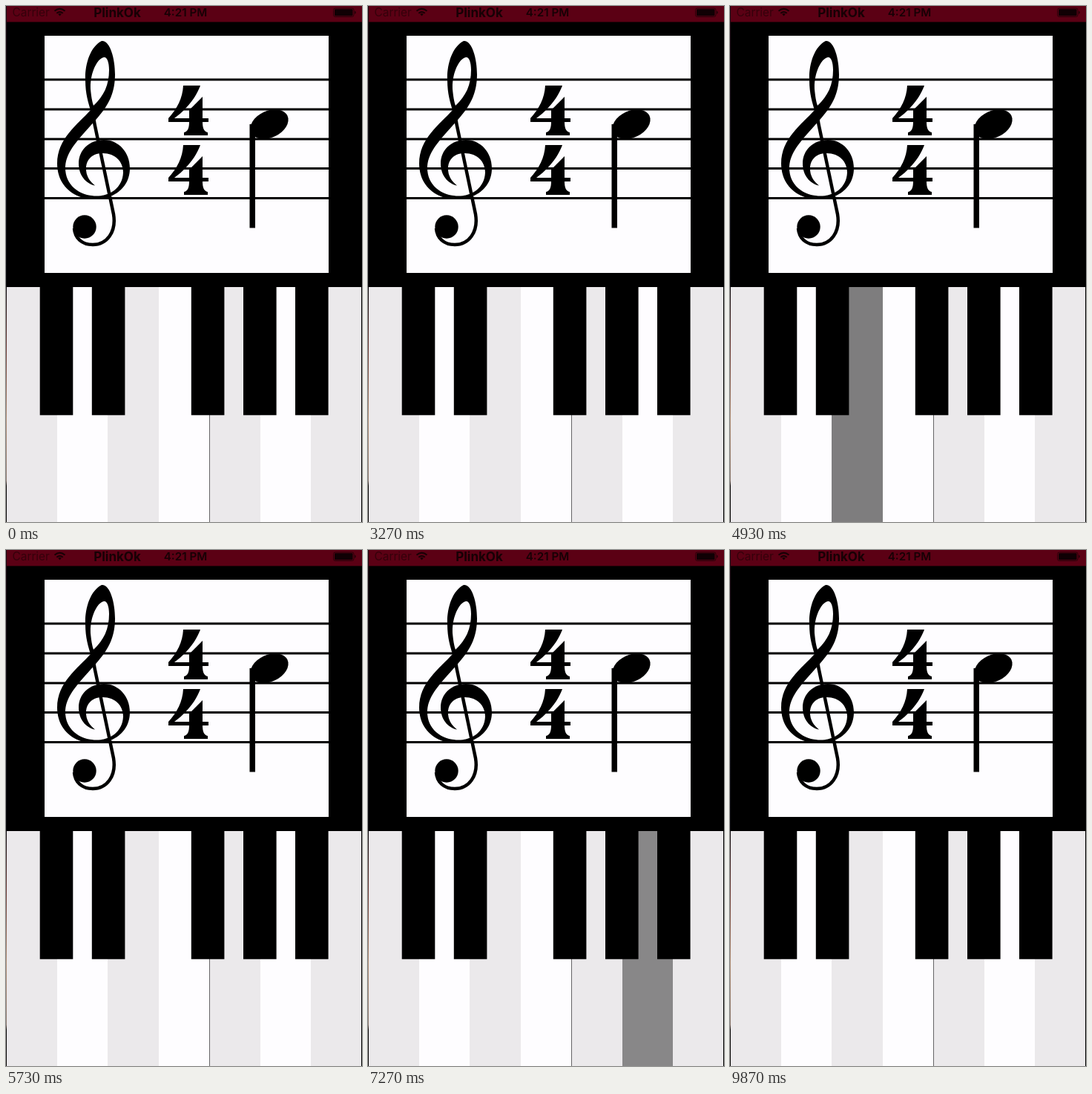
Recreate the animation shown at these times as an HTML page. Size 480 by 694 pixels, loop 9.99 s.

```html
<!DOCTYPE html>
<html lang="en">
<head>
<meta charset="utf-8">
<title>Piano note trainer</title>
<style>
  html, body { margin: 0; width: 100%; height: 100%; overflow: hidden; background: #000; }
  svg { display: block; width: 480px; height: 694px; }
  text { font-family: Inter, "Liberation Sans", sans-serif; fill: #170005; }
</style>
</head>
<body>
<svg viewBox="0 0 480 694">
  <defs>
    <linearGradient id="edge" x2="0" y2="1">
      <stop offset="0" stop-color="#1a0710"/>
      <stop offset=".34" stop-color="#15151f"/>
      <stop offset=".54" stop-color="#08080c"/>
      <stop offset=".66" stop-color="#6b3a34"/>
      <stop offset=".8" stop-color="#b08f76"/>
      <stop offset=".92" stop-color="#8d7a70"/>
      <stop offset=".93" stop-color="#0a0808"/>
    </linearGradient>
    <path id="four" d="M239 107H262C256 124 242 140 227 151H247V140L265 122V151H273V156H265C265 164 267 169 272 170V174H240V170C245 169 247 164 247 156H219V151C231 138 238 124 239 107Z"/>
  </defs>

  <rect width="480" height="694"/>
  <rect width="480" height="21.5" fill="#5b0014"/>

  <!-- status bar -->
  <text x="8.5" y="14" font-size="15.4" style="fill:#35000b">Carrier</text>
  <g fill="none" stroke="#170005" stroke-width="2">
    <path d="M65.5 6.8Q72.5 .8 79.5 6.8M68.3 9.8Q72.5 6.2 76.7 9.8"/>
    <path d="M72.5 13.5L70.3 11Q72.5 9.2 74.7 11Z" fill="#170005" stroke="none"/>
  </g>
  <text x="150" y="14.8" font-size="17" font-weight="700" text-anchor="middle">PlinkOk</text>
  <text x="242" y="14" font-size="15.2" font-weight="600" text-anchor="middle">4:21 PM</text>
  <g fill="#100004">
    <rect x="441.5" y="3" width="27.5" height="11.5" rx="2.5" fill="none" stroke="#2a0009"/>
    <rect x="443" y="4.3" width="24.5" height="9" rx="1.2"/>
    <path d="M470.3 6.5Q473 8.7 470.3 11Z"/>
  </g>

  <!-- score -->
  <rect x="52" y="40" width="383" height="319" fill="#fefdff"/>
  <path d="M52 99H435M52 139H435M52 179H435M52 218.5H435M52 258.5H435" stroke="#000" stroke-width="3"/>
  <path fill-rule="evenodd" d="M129 47C113 55 106 80 107 100C107 118 111 130 114 140C97 159 69 178 69 212C69 242 92 260 119 260C146 260 167 244 167 218C167 196 151 180 132 180C112 180 98 194 98 212C98 228 108 239 120 241.5C112 235 108 228 108 219C108 205 118 198 130 198C148 198 158 210 158 224C157 245 140 255.5 122 255.5C98 255.5 80 240 80 218C80 200 92 186 105 171L122 152C140 132 147 115 147 92C147 70 140 46 129 47Z
    M139 86C139 75 136 68 132 69C122 71 113 92 114 112C115 122 116 128 118 134C132 121 139 106 139 86Z"/>
  <path d="M116 134Q118 153 121 166L145 280C149 304 136 321 117 321C102 321 93 312 92 299" fill="none" stroke="#000" stroke-width="4.5"/>
  <circle cx="106" cy="297" r="15.7"/>
  <use href="#four"/>
  <use href="#four" y="80"/>
  <ellipse cx="355" cy="159" rx="27" ry="18" transform="rotate(-25 355 159)"/>
  <rect x="328.5" y="159" width="7.5" height="139.5"/>

  <g id="keys"></g>
  <rect width="1" height="694" fill="url(#edge)"/>
</svg>
<script>
const LOOP = 9990, DIM = .465;
const keys = document.getElementById('keys');

// [press, release] in ms
const whites = [
  [2730, 3070], [4000, 4200], [4870, 5200], [5470, 5730],
  [6330, 6530], [7270, 7530], [8070, 8270]
];
// [left edge, press, release]
const blacks = [
  [45.7, 3470, 3730], [115.8, 4470, 4730], [249.8, 5930, 6130],
  [320, 6870, 7070], [390, 7670, 7870]
];

function rect(x, w, h, fill) {
  const r = document.createElementNS('http://www.w3.org/2000/svg', 'rect');
  const attrs = { x, y: 378, width: w, height: h, fill };
  for (const name in attrs) r.setAttribute(name, attrs[name]);
  return keys.appendChild(r);
}

function addKey(x, w, h, fill, press, release) {
  rect(x, w, h, fill);
  const shade = rect(x, w, h, '#000');
  const hold = (opacity, t) => ({ opacity, offset: t / LOOP, easing: 'steps(1, end)' });
  shade.animate(
    [hold(0, 0), hold(DIM, press), hold(0, release), hold(0, LOOP)],
    { duration: LOOP, iterations: Infinity }
  );
}

whites.forEach(([press, release], i) => {
  const left = [1, 69, 137, 206, 275, 343, 411, 479];
  const width = left[i + 1] - left[i] - (i === 3 ? .6 : 0);
  addKey(left[i], width, 316, i % 2 ? '#fefdff' : '#ebe9eb', press, release);
});
blacks.forEach(([x, press, release]) => addKey(x, 44.6, 172.3, '#000', press, release));
</script>
</body>
</html>
```
